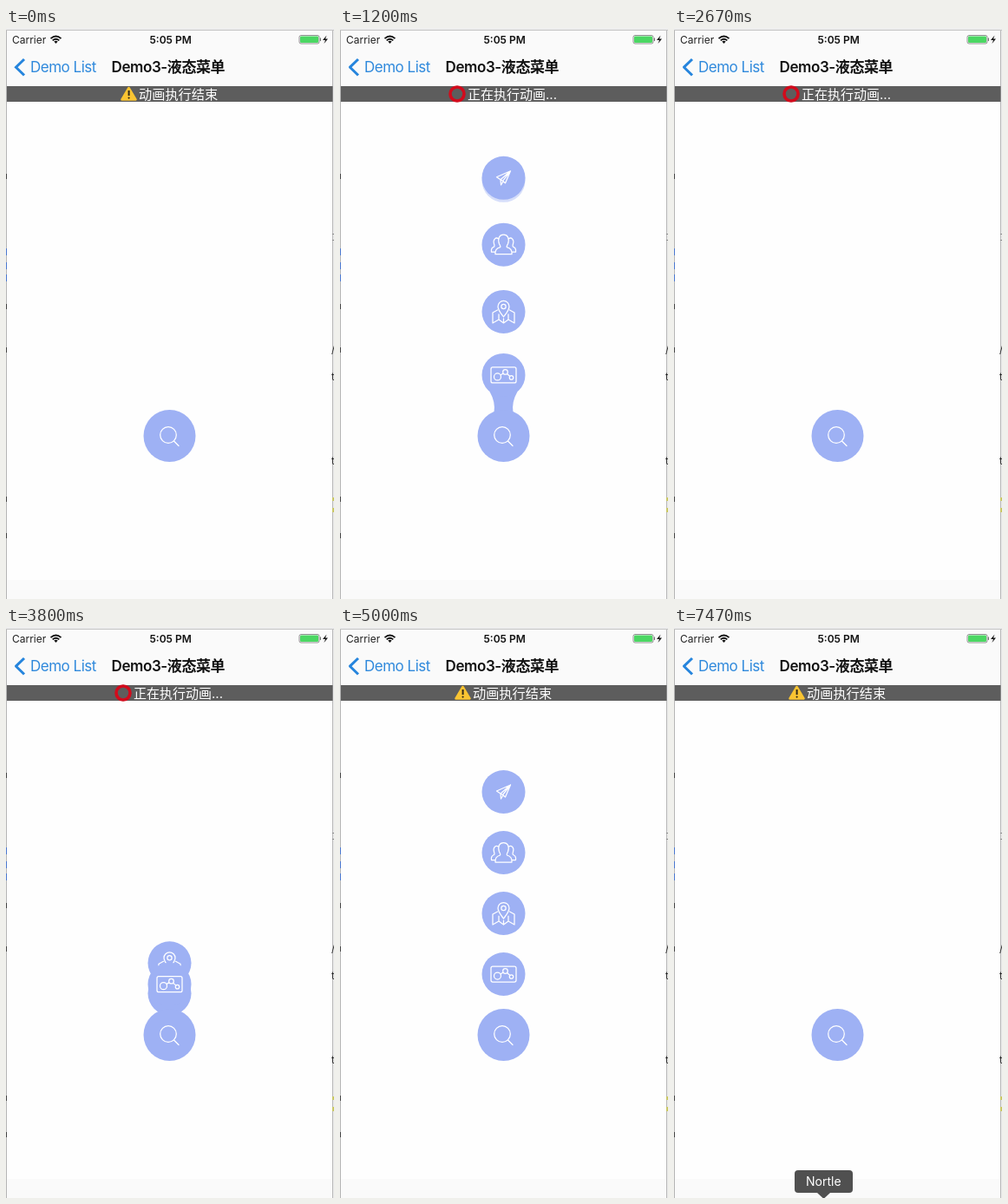
Animation of 378 by 658 pixels, one loop 7540 ms. Source, as an HTML page with a canvas:

```html
<!DOCTYPE html>
<html lang="zh">
<head>
<meta charset="utf-8">
<style>
html, body { margin: 0; width: 100%; height: 100%; overflow: hidden; background: #fefefe; }
canvas { display: block; }
</style>
</head>
<body>
<canvas id="stage" width="378" height="658"></canvas>
<script>
const ctx = document.getElementById('stage').getContext('2d');
const LOOP = 7540, BLUE = '#9eb1f4', CX = 188.5, HOME = 470, GAP = 70;
const FONT = 'Inter, "Noto Sans CJK SC", "Noto Sans CJK", sans-serif';
// Start times of each opening and closing of the menu.
const CYCLES = [{ open: 235, close: 2090 }, { open: 3510, close: 6100 }];
const OPEN = { dur: 1000, lag: 117 }, CLOSE = { dur: 330, lag: 80 };
const OPEN_TIME = OPEN.dur + 3 * OPEN.lag, CLOSE_TIME = CLOSE.dur + 3 * CLOSE.lag + 90;

const clamp = (v, a = 0, b = 1) => Math.min(b, Math.max(a, v));
const backOut = u => { const v = u - 1; return 1 + 2.3 * v ** 3 + 1.3 * v * v; };

function rect(x, y, w, h, color) {
  ctx.fillStyle = color;
  ctx.fillRect(x, y, w, h);
}
function disc(x, y, r, color) {
  ctx.fillStyle = color;
  ctx.beginPath();
  ctx.arc(x, y, r, 0, 7);
  ctx.fill();
}
function roundBox(x, y, w, h, r, color) {
  ctx.fillStyle = color;
  ctx.beginPath();
  ctx.roundRect(x, y, w, h, r);
  ctx.fill();
}
function fillPath(d, color) {
  ctx.fillStyle = color;
  ctx.fill(new Path2D(d));
}
function strokePath(d, color, width) {
  ctx.strokeStyle = color;
  ctx.lineWidth = width;
  ctx.stroke(new Path2D(d));
}
function text(s, x, y, size, color, weight = 400, spacing = 0) {
  ctx.font = `${weight} ${size}px ${FONT}`;
  ctx.letterSpacing = spacing + 'px';
  ctx.fillStyle = color;
  ctx.fillText(s, x, y);
}
const ring = (x, y, r) => `M${x + r} ${y}a${r} ${r} 0 1 1 ${-2 * r} 0a${r} ${r} 0 1 1 ${2 * r} 0`;

const SEARCH = ring(-1.5, -1, 9.3) + 'M5 6L10.5 11.5';
// Icons from the lowest item to the highest.
const ICONS = [
  'M-12.5-9H12.5Q14.5-9 14.5-7V7Q14.5 9 12.5 9H-12.5Q-14.5 9-14.5 7V-7Q-14.5-9-12.5-9Z'
    + ring(-7, 2, 4) + ring(2, -3.5, 2.8) + ring(9, 3, 2.2) + 'M-3.5 0L-.5-2M4-1.5L7.5 1.5',
  'M0 6C-3 2-6.5-2-6.5-6A6.5 6.5 0 0 1 6.5-6C6.5-2 3 2 0 6Z' + ring(0, -6, 2.6)
    + 'M-7-2L-12.5 1V13L-5.5 9L0 13L5.5 9L12.5 13V1L7-2M-5.5 3V9M0 8V13M5.5 3V9',
  'M-9.5 11C-10 6-8 4-4 3C-3 2-4 1-5-1C-7-7-5-11.5 0-11.5S7-7 5-1C4 1 3 2 4 3C8 4 10 6 9.5 11Z'
    + 'M-6-7C-9-9-12.5-6-11-1C-10.5 1-10 1.5-11 2.5C-14 3.5-14.5 5-14 8.5H-10'
    + 'M6-7C9-9 12.5-6 11-1C10.5 1 10 1.5 11 2.5C14 3.5 14.5 5 14 8.5H10',
  'M8-8L-8-1L-3.5 2L8-8L2 6L-1 3.5L-3.5 2L-3 8L-.5 4M8-8L-1 3.5'
];

function icon(path, y) {
  ctx.save();
  ctx.translate(CX, y);
  ctx.lineCap = ctx.lineJoin = 'round';
  strokePath(path, '#fff', 1.25);
  ctx.restore();
}

// Height and opening progress of one item.
function itemState(i, t) {
  const c = t < CYCLES[1].open ? CYCLES[0] : CYCLES[1];
  const span = (i + 1) * GAP;
  if (t >= c.close) {
    const u = clamp((t - c.close - (3 - i) * CLOSE.lag) / CLOSE.dur);
    return { y: HOME - span * (1 - u * u), u: 1 };
  }
  const u = clamp((t - c.open - i * OPEN.lag) / OPEN.dur);
  return { y: HOME - span * backOut(u), u };
}

function neck(top, bottom, r) {
  const d = bottom - top;
  if (d < 25 || d > r + 43) return;
  const a = top + 19, b = bottom - r + 3, m = (a + b) / 2;
  fillPath(`M${CX - 16} ${a}Q${CX - 9} ${m} ${CX - 11} ${b}H${CX + 11}Q${CX + 9} ${m} ${CX + 16} ${a}Z`, BLUE);
}

function menu(t) {
  const items = ICONS.map((_, i) => itemState(i, t));
  const opening = CYCLES.some(c => t >= c.open && t < c.open + OPEN_TIME);
  if (opening) {
    items.forEach(({ y, u }, i) => {
      const over = HOME - (i + 1) * GAP - y;
      if (over <= 0) return;
      ctx.globalAlpha = clamp(0.6 - (u - 0.565) * 3.6, 0, 0.6);
      disc(CX, y + Math.min(3, over), 25, BLUE);
      ctx.globalAlpha = 1;
    });
    items.forEach(({ y }, i) => neck(y, i ? items[i - 1].y : HOME, i ? 25 : 30));
  }
  for (let i = 3; i >= 0; i--) {
    disc(CX, items[i].y, 25, BLUE);
    icon(ICONS[i], items[i].y);
  }
  disc(CX, HOME, 30, BLUE);
  icon(SEARCH, HOME);
}

function statusBar() {
  text('Carrier', 7, 17.5, 12, '#222');
  text('5:05 PM', 165.5, 17.5, 12, '#111', 600);
  ctx.lineCap = 'butt';
  strokePath('M51.5 12.2Q57.5 6.8 63.5 12.2M53.7 14.4Q57.5 11 61.3 14.4', '#111', 1.8);
  fillPath('M57.5 18L55.3 15.6Q57.5 14 59.7 15.6Z', '#111');
  ctx.strokeStyle = '#777';
  ctx.lineWidth = 0.8;
  ctx.beginPath();
  ctx.roundRect(338, 8.5, 23, 9.5, 2);
  ctx.stroke();
  roundBox(339, 9.5, 21, 7.5, 1.2, '#4bd763');
  rect(361.8, 11.5, 1.2, 3.5, '#777');
  fillPath('M369.5 8.5L365 14H368L366.5 18L371 12.5H368Z', '#111');
}

function navBar() {
  ctx.lineCap = 'butt';
  strokePath('M21 36L11.5 45.2L21 54.5', '#2685dd', 3);
  text('Demo List', 28, 51, 17, '#2f89dc', 400, -0.5);
  text('Demo3-液态菜单', 121.5, 51, 17, '#111', 600, -0.4);
}

function banner(busy) {
  rect(1, 67, 375.5, 18, '#5d5d5d');
  if (busy) {
    strokePath(ring(135, 76, 8), '#d20b1c', 3.6);
    text('正在执行动画...', 147, 81.5, 15, '#fff');
  } else {
    ctx.lineJoin = 'round';
    strokePath('M141.5 69L149.5 82.5H133.5Z', '#f9c432', 2.5);
    fillPath('M141.5 69L149.5 82.5H133.5Z', '#f9c432');
    rect(140.6, 72, 2, 6, '#332a18');
    disc(141.6, 80.6, 1.1, '#332a18');
    text('动画执行结束', 153, 81.5, 15.2, '#fff');
  }
}

function edges() {
  rect(0, 0, 378, 2, '#eee');
  rect(0, 2, 378, 1, '#c4c4c4');
  rect(0, 3, 1, 655, '#b5b5b5');
  rect(376, 3, 1, 655, '#b5b5b5');
  rect(377, 3, 1, 655, '#eee');
  for (const y of [254, 270, 284]) rect(0, y, 1, 8, '#4a78d0');
  for (const y of [168, 318, 368, 540, 582]) rect(0, y, 1, 6, '#444');
  for (const y of [237, 244]) rect(376, y, 2, 1, '#888');
  text('/', 375, 375, 11, '#222');
  text('t', 375, 406, 11, '#222');
  text('t', 375, 503, 11, '#222');
  rect(376, 541, 2, 4, '#c9c765');
  rect(376, 553, 2, 5, '#c9c765');
}

function tooltip() {
  roundBox(139, 626, 67, 26, 4, '#505050');
  fillPath('M165 652H180L173.5 658H171.5Z', '#505050');
  text('Nortle', 152, 644, 14, '#fff');
}

function frame(now) {
  const t = now % LOOP;
  const busy = CYCLES.some(c =>
    (t >= c.open && t < c.open + OPEN_TIME) || (t >= c.close && t < c.close + CLOSE_TIME));
  rect(0, 0, 378, 658, '#fefefe');
  rect(0, 3, 377, 64, '#fafafa');
  rect(0, 636, 377, 22, '#fafafa');
  edges();
  statusBar();
  navBar();
  banner(busy);
  menu(t);
  if (t >= 7000) tooltip();
  requestAnimationFrame(frame);
}
requestAnimationFrame(frame);
</script>
</body>
</html>
```
